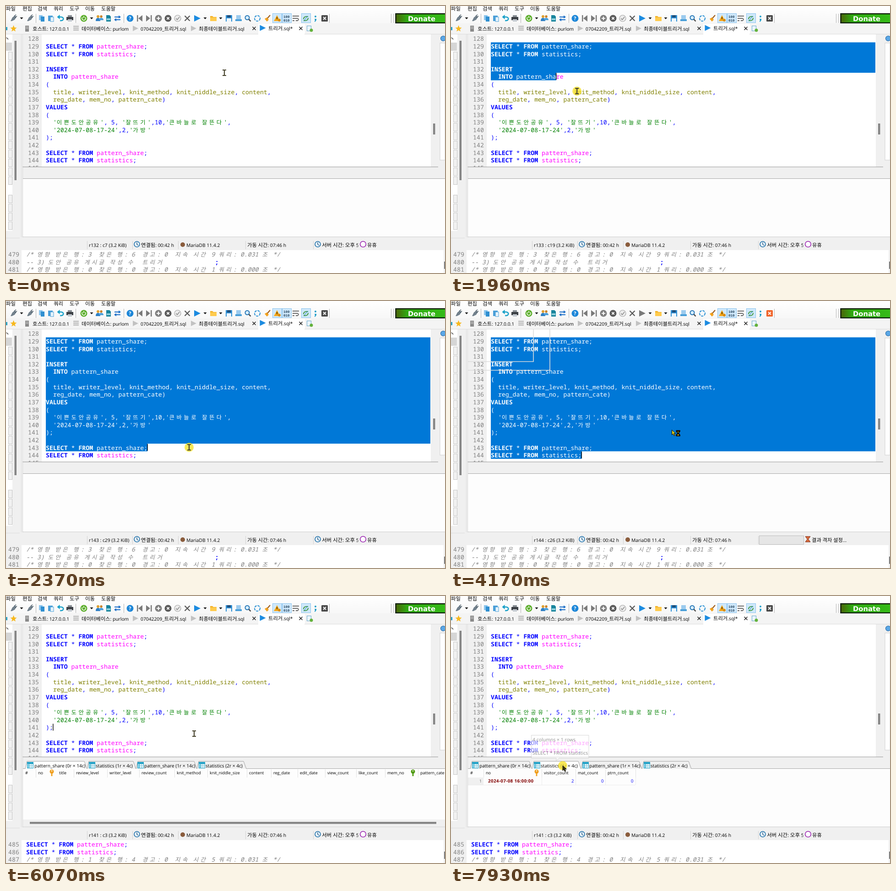
These frames come from a looping animation (959x584 px, 8 s). An HTML page:

```html
<!DOCTYPE html>
<html lang="ko">
<head>
<meta charset="utf-8">
<title>SQL editor</title>
<style>
html, body { margin: 0; width: 100%; height: 100%; overflow: hidden; background: #fff; }
svg { display: block; width: 959px; height: 584px; }
text { white-space: pre; text-rendering: geometricPrecision; }
.ui { font-family: "Open Sans", "Noto Sans CJK KR", sans-serif; }
.ko { font-family: "Noto Sans CJK KR", sans-serif; }
.ui .ko { font-size: 1.1em; }
.code { font-family: "Noto Sans Mono", "Noto Sans CJK KR", monospace; font-size: 13.2px; font-weight: 500; }
.code .ko { font-size: .94em; font-weight: 400; }
.code.bold { font-weight: 700; }
.code.slant { font-style: italic; font-weight: 400; }
.white text { fill: #fff; }
</style>
</head>
<body>
<svg id="stage" viewBox="0 0 959 584"></svg>
<script>
const stage = document.getElementById('stage');
const CELL = 7.93, ROW = 16.62, LEFT = 87, TOP = 79.4, FIRST = 129;
const BLUE = '#0000ff', SEL = '#0078d7', GREY = '#f0f0f0';

const code = [
  '', 'SELECT * FROM pattern_share;', 'SELECT * FROM statistics;', '', 'INSERT',
  '  INTO pattern_share', '(',
  '  title, writer_level, knit_method, knit_niddle_size, content,',
  '  reg_date, mem_no, pattern_cate)', 'VALUES', '(',
  "  '이쁜도안공유', 5, '잘뜨기',10,'큰바늘로 잘뜬다',",
  "  '2024-07-08-17-24',2,'가방'", ');', '',
  'SELECT * FROM pattern_share;', 'SELECT * FROM statistics;'
];

// drawing helpers
const cells = s => [...s].reduce((n, c) => n + (c >= '가' ? 2 : 1), 0);
const hangul = s => s.replace(/[가-힣]+/g, m => `<tspan class="ko">${m}</tspan>`);
const rect = (x, y, w, h, fill, more = '') =>
  `<rect x="${x}" y="${y}" width="${w}" height="${h}" fill="${fill}" ${more}/>`;
const path = (d, fill, stroke = 'none', w = 1) =>
  `<path d="${d}" fill="${fill}" stroke="${stroke}" stroke-width="${w}"/>`;
const line = (d, stroke, w = 1) => path(d, 'none', stroke, w);
const disc = (x, y, r, fill, stroke = 'none', w = 1) =>
  `<circle cx="${x}" cy="${y}" r="${r}" fill="${fill}" stroke="${stroke}" stroke-width="${w}"/>`;
const group = (id, body, more = '') => `<g id="${id}" ${more}>${body}</g>`;
const ui = (x, y, s, size = 10.3, fill = '#000', more = '') =>
  `<text class="ui" x="${x}" y="${y}" font-size="${size}" fill="${fill}" ${more}>${hangul(s)}</text>`;

function mono(x, y, s, fill, style = '') {
  const xs = [];
  for (const c of s) { xs.push(x.toFixed(1)); x += CELL * cells(c); }
  return `<text class="code ${style}" x="${xs.join(' ')}" y="${y}" fill="${fill}">${hangul(s)}</text>`;
}
function sql(x, y, s) {
  let out = '';
  for (const tok of s.match(/'[^']*'|[a-zA-Z_]+|[^'a-zA-Z_]+/g) || []) {
    const fill = tok[0] === "'" ? '#008000' : /pattern_share|statistics/.test(tok) ? '#ff00ff'
      : /^[a-z]/.test(tok) ? '#808000' : BLUE;
    out += mono(x, y, tok, fill, /^[A-Z]+$/.test(tok) ? 'bold' : '');
    x += CELL * cells(tok);
  }
  return out;
}
const note = (y, s) => mono(44, y, s, '#808080', 'slant');
const affected = (y, a, b, n, time) =>
  note(y, `/* 영향 받은 행: ${a}  찾은 행: ${b}  경고: 0  지속 시간 ${n} 쿼리: ${time} 조 */`);
const play = (x, y, fill, r = 7, id = '') =>
  `<path ${id && `id="${id}"`} d="M${x - r} ${y - r}l${2 * r} ${r}-${2 * r} ${r}z" fill="${fill}"/>`;
const drop = x => path(`M${x - 3.5} 25h7l-3.5 4z`, '#111');
const cross = (x, y, r, c, w = 1.5) =>
  line(`M${x - r} ${y - r}l${2 * r} ${2 * r}m0-${2 * r}l-${2 * r} ${2 * r}`, c, w);
const clock = x => disc(x, 521, 6, '#e8f4fc', '#1e6fa8', 1.6) + line(`M${x} 517v4.5l3 2`, '#1e4f78', 1.3);
const key = (x, y, c) => disc(x, y - 3, 4.5, c) + disc(x, y - 4.5, 1.2, '#fff') + rect(x - 1.4, y, 2.8, 7, c);
const sheet = (x, y) => rect(x, y, 14, 14, '#1f9fc4') + rect(x + 1, y + 4, 3, 9, '#8fd6ea') +
  rect(x + 5, y + 4.5, 8, 8.5, '#e9f7fb') + line(`M${x + 9} ${y + 4}v9M${x + 5} ${y + 8.5}h8`, '#7fc4d8');

function toolbar() {
  const plug = x => path(`M${x - 6} 33l4-8 5-4 4 3-4 6-6 3z`, '#71808c') + line(`M${x + 2} 22l4-3m-2 6l4-3`, '#3b4c58', 1.5);
  let s = rect(0, 0, 959, 38, 'url(#bar)');
  '파일 편집 검색 쿼리 도구 이동 도움말'.split(' ').forEach((m, i) =>
    s += ui([0, 36, 69, 104, 139, 173, 208][i], 10, m));
  s += plug(16) + drop(34) + plug(52);
  for (const x of [65, 152, 257, 706, 841, 846]) s += line(`M${x}.5 17v20`, '#b4b4b4');
  s += rect(72, 20, 8, 11, '#8cc6ee') + rect(76, 23, 8, 11, '#2f8fd0');
  s += rect(92, 21, 10, 12, '#4a9fd8') + rect(97, 24, 7, 10, '#e6f3fb', 'stroke="#4a9fd8"');
  s += line('M116 24h4c7 0 7 8 0 8h-2', '#18a0c8', 2.6) + path('M111.500 24l6-5v10z', '#18a0c8');
  s += rect(132, 24, 15, 7, '#3d4146') + rect(135, 20, 9, 4, '#8a9096') + rect(135, 29, 9, 5, '#c3c9cf');
  s += disc(170, 27, 7.5, '#5cae2c') + line('M167 24.500a4 4 0 1 0 6 0M170 22v4', '#fff', 1.6) + drop(187);
  s += disc(201, 23, 3, '#e0a030') + path('M196 33q0-7 5-7t5 7z', '#2f7fc4') +
    disc(208, 23, 2.7, '#c98228') + path('M203 31q0-5 5-5t5 5z', '#4da0dc');
  s += path('M219 20h7l3 3v11h-10z', '#18849c') + rect(220, 27, 8, 4, '#8fd0dc');
  s += line('M237 24h10M240 30h10', '#1d6fc8', 2) + path('M246 20.500l5 3.500-5 3.500zM241 26.500l-5 3.500 5 3.500z', '#1d6fc8');
  s += disc(271, 27, 7.5, '#1c86d8') + ui(268.300, 31, '?', 11, '#fff', 'font-weight="700"');
  s += rect(286, 20, 2.5, 14, '#7a7a7a') + path('M298 20v14l-9-7z', '#7a7a7a');
  s += rect(316, 20, 2.5, 14, '#7a7a7a') + path('M306 20v14l9-7z', '#7a7a7a');
  s += disc(333, 27, 7.5, '#808080') + line('M329 27h8m-4-4v8', '#fff', 2);
  s += disc(354, 27, 7.5, '#5a5a5a') + cross(354, 27, 2.6, '#fff', 2);
  s += disc(375, 27, 7, '#ececec', '#a6a6a6', 1.2) + line('M371.500 27l2.500 3 5-6', '#8c8c8c', 1.6);
  s += cross(396, 27, 5.5, '#5a5a5a', 2.4) + play(418, 27, '#1c8be0', 7, 'run') + drop(435);
  s += path('M446 22h5l2 2h7v9h-14z', '#f3b32a') + rect(446, 25, 14, 8, '#ffcb4d') + drop(469);
  s += rect(480, 20, 14, 14, '#2f8fd4') + rect(483, 20, 8, 5, '#1d4f7c') + rect(482, 27, 10, 7, '#eef6fc');
  s += rect(503, 20, 10, 9, '#9ccbee') + rect(501, 29, 14, 4, '#4a9fd8');
  s += disc(527, 25.500, 4.5, '#d8eefb', '#2878b8', 2) + line('M530.500 29l4 4.500', '#444', 2.5);
  s += `<circle cx="549" cy="27" r="6" fill="none" stroke="#2a90d4" stroke-width="2" stroke-dasharray="5 2"/>`;
  s += path('M565 28l5-3 4 5-4 4z', '#f2a11c') + line('M571 27l6-7', '#a36424', 2.5);
  for (const x of [582, 603, 645]) s += rect(x + .5, 16.500, 20, 20, '#cfe8fb', 'stroke="#8cc4ee"');
  s += path('M592 20l7 13h-14z', '#f5a71a') + rect(591.200, 24, 1.6, 5, '#4a3000') + disc(597, 31, 3, '#d98c10');
  s += ['100', '010'].map((d, i) => `<text x="606" y="${26 + i * 8}" font-size="7.500" font-weight="700" fill="#24435c" font-family="Liberation Mono,monospace">${d}</text>`).join('');
  s += line('M626 22h14M626 27h11q4 2 0 5h-4M626 32h4', '#6a6a6a', 1.8);
  s += line('M650 29q0-6 7-6h3M660 26q0 6-7 6h-3', '#4a9c4a', 2) + line('M651 32l8-10', '#2f8cc0', 1.2);
  s += disc(676, 23, 2, '#1c9cc8') + path('M674 28h4v3l-3 4-1-1 1-3z', '#1c9cc8');
  s += `<rect id="stop" x="689" y="20" width="14" height="14" rx="1.500"/>` + cross(696, 27, 3, '#fff', 1.8);
  s += rect(851.500, 17, 112, 20, 'url(#green)', 'stroke="#0a1a04" stroke-width="2.400"') +
    '<text x="878" y="33" font-size="14.800" font-weight="700" fill="#fff" font-family="DejaVu Sans,sans-serif">Donate</text>';
  return s;
}

function tabs() {
  let s = rect(0, 38, 959, 24, '#f4f4f4') + rect(551, 39, 102, 23, '#fff') + line('M0 61.500H551M652 61.500H959', '#dcdcdc');
  s += rect(0, 46, 3, 7, '#2ea3c4') +
    path('M16.500 42l2 5 5 .4-4 3.300 1.300 5-4.300-2.800-4.300 2.800 1.300-5-4-3.300 5-.4z', '#f7b81e');
  s += rect(42, 43, 8, 13, '#8a8a8a') + line('M43 46h6M43 49h6', '#ddd');
  s += [43, 47, 51].map(y => rect(147, y, 12, 3, '#c4c4c4')).join('');
  s += play(283, 49, '#c2c2c2', 6) + play(410, 49, '#c2c2c2', 6) + play(561, 48, '#1c8be0', 6.5);
  s += ui(58, 54, '호스트: 127.0.0.1') + ui(165, 54, '데이터베이스: purlom') + ui(294, 54, '07042209_트리거.sql') +
    ui(421, 54, '최종테이블트리거.sql') + ui(573, 53, '트리거.sql*');
  s += cross(542, 49, 3.5, '#222') + cross(644, 49, 3.5, '#222');
  s += rect(657.500, 43.500, 9, 11, '#eaf4fb', 'stroke="#6aa8cc"') + disc(667, 53, 3.5, '#62b13a');
  return s;
}

function sidePanels() {
  let s = rect(0, 62, 36, 446, GREY) + rect(0, 62, 14, 430, '#fff') + rect(0, 80, 13, 18, '#d6d6d6') + line('M1 69l4 4', '#333', 1.2);
  const box = y => rect(5.500, y + .5, 8, 17, '#f1f1f1', 'stroke="#c6c6c6"');
  for (let i = 0; i < 15; i++) s += box(100 + i * 19.500);
  for (let i = 0; i < 4; i++) s += box(413 + i * 19.500);
  s += rect(18.500, 76, 4.5, 305, '#868686') + line('M33.500 62V506M0 507.500H30', '#dcdcdc');
  s += rect(944, 62, 15, 291, GREY) + rect(948, 81, 11, 256, '#fff', 'stroke="#d0d0d0"') +
    disc(955, 71, 5.5, '#5aa7e6', '#2f6fa8', 1.2);
  return s;
}

const baseline = n => (76.300 + (n - 128) * ROW).toFixed(1);

function editor() {
  let s = rect(36, 62, 892, 290, '#fff') + rect(37, 62, 41, 290, GREY);
  for (let n = 128; n < 146; n++) s += mono(48, baseline(n), '' + n, '#808080');
  const lines = code.map((c, i) => sql(LEFT, baseline(128 + i), c)).join('');
  s += lines + group('picked', rect(80, 62, 850, 290, SEL) + lines, 'class="white" clip-path="url(#sel)"');
  s += `<rect id="caret" width="1.400" height="15" fill="#000"/>`;
  s += group('frames', line('M37 132.500H180V62M37 151.500H216V62', '#dcdcdc', 1.6));
  return `<g clip-path="url(#pane)">${s}</g>` +
    rect(928, 62, 16, 290, GREY) + rect(933, 257, 4.5, 24, '#858585') +
    line('M36.500 62V352', '#dedede') + line('M36 352H944', '#8c8c8c');
}

const head = (list, seps) => list.map(([x, s]) => ui(x, 390, s, 9)).join('') +
  seps.map(x => line(`M${x}.5 379V397`, '#e2e2e2')).join('');
const heel = [42, 177, 284, 417, 525];
const tab = (i, on) => path(`M${heel[i]} 378l4-16.500H${heel[i + 1] - 6}l6 16.500`, on ? '#fff' : GREY, '#a4a4a4');

function results() {
  const names = ['pattern_share (0r × 14c)', 'statistics (1r × 4c)', 'pattern_share (1r × 14c)', 'statistics (2r × 4c)'];
  const strip = on => heel.slice(0, 4).map((_, i) => tab(i, i === on)).join('') +
    names.map((n, i) => sheet([46, 181, 287, 421][i], 363) + ui([62, 196, 302, 436][i], 374.500, n, 10.1)).join('');
  const cols = 'title review_level writer_level review_count knit_method knit_niddle_size content reg_date edit_date view_count like_count mem_no'.split(' ');
  const at = [116, 153, 226, 296, 373, 445, 531, 584, 642, 702, 770, 833];
  const wide = strip(0) + head([[42, '#'], [70, 'no'], [905, 'pattern_cate'], ...cols.map((c, i) => [at[i], c])],
    [65, ...at.slice(1).map(x => x - 5), 900]) + key(100, 387, '#f0a020') + key(889, 387, '#4f9a10') +
    rect(37, 489, 922, 15, GREY) + rect(52, 494, 888, 4.5, '#858585');
  const small = strip(1) + head([[42, '#'], [76, 'no'], [203, 'visitor_count'], [277, 'mat_count'], [342, 'ptrn_count']],
    [71, 198, 272, 337, 403]) + key(187, 387, '#f0a020') + rect(37, 397, 34, 16, GREY) +
    ui(62, 408, '1', 9, '#666') +
    ui(81, 408, '2024-07-08 16:00:00', 9.8, '#800000', 'font-weight="700" letter-spacing=".35"') +
    [['2', 263], ['0', 328], ['0', 393]].map(([v, x]) => ui(x, 408, v, 9.5, BLUE)).join('') +
    line('M37 413.500H403M198.500 397V413M272.500 397V413M337.500 397V413M403.500 397V413', '#ececec');
  return rect(34, 353, 925, 25, GREY) + rect(36, 378, 923, 128, '#fdfdfd') + line('M36 377.500H959', '#a8a8a8') +
    group('wide', wide) + group('small', small) +
    line('M36.500 353V506', '#d8d8d8') + line('M36 505H959', '#c4c4c4') + rect(36, 506, 923, 7, GREY);
}

function status() {
  let s = rect(0, 508, 959, 26, GREY);
  for (const x of [177, 276, 376, 523, 671]) s += line(`M${x}.5 514V532`, '#d2d2d2');
  s += '<text id="pos" class="ui" x="181" y="527" font-size="10.300"></text>';
  s += clock(286) + ui(295, 527, '연결됨: 00:42 h') + disc(386, 522, 5, '#8a5c3c') + ui(394, 527, 'MariaDB 11.4.2') + ui(527, 527, '가동 시간: 07:46 h');
  s += group('idle', clock(681) + `<g clip-path="url(#cut)">${ui(690, 527, '서버 시간: 오후 5', 10.5)}</g>` +
    disc(780, 521, 6.300, '#fff', '#9a22b0', 1.6) + ui(789, 527, '유휴'));
  s += group('working', rect(673.500, 513.500, 97, 19, '#e6e6e6', 'stroke="#bdbdbd"') +
    path('M774 515h11l-4.500 6 4.500 6h-11l4.500-6z', '#d96a3a', '#7a2c18') + ui(788, 527, '결과 격자 설정...'));
  return s;
}

function log() {
  const y = [548, 564.600, 581.200];
  const nums = n => y.map((v, i) => mono(5, v, '' + (n + i), '#808080')).join('');
  return rect(0, 534, 959, 50, '#fff') + rect(0, 534, 34, 50, GREY) + rect(956, 534, 3, 50, GREY) + rect(957, 559, 2, 16, '#777') +
    group('before', nums(479) + affected(y[0], 3, 6, 9, '0.031') + note(y[1], '-- 3) 도안 공유 게시글 작성 수  트리거') +
      mono(44 + 52 * CELL, y[1], ';', BLUE, 'bold') + affected(y[2], 0, 0, 1, '0.000')) +
    group('after', nums(485) + sql(44, y[0], code[1]) + sql(44, y[1], code[2]) + affected(y[2], 1, 4, 5, '0.031'));
}

const tip = group('tip', path('M175.500 304.500h125.500v50h-65l-6 6v-6h-54.500z', '#fff', '#c4c4c4') +
  ui(178, 318, '4 columns × 1 rows', 10.5, '#555') + ui(178, 347, 'SELECT * FROM statistics', 10.5, '#555'));

const beam = 'M-4-6h3q1 0 1 1q0-1 1-1h3M0-5V5M-4 6h3q1 0 1-1q0 1 1 1h3';
const arrow = 'M0 0v11l2.700-2.500 2 4.500 2-1-2-4.300h3.700z';
const mouse = group('mouse', group('halo', disc(0, 0, 10, '#f5e020'), 'opacity=".75"') +
  group('beam', line(beam, '#46422c', 2.2)) +
  group('lit', line(beam, '#101010', 3.2) + line(beam, '#e8d820', 1.1)) +
  group('arrow', path(arrow, '#3a3408', '#111')) +
  group('wait', path(arrow, '#d8c818', '#111') +
    path('M9.500 1h8.500v2.500l-3 3.500 3 3.500v3H9.500v-3l3-3.500-3-3.500z', '#111', '#111') +
    path('M12 4h3.500l-1.700 2zM11.500 12l2.300-3 2.300 3z', '#d8c818')));

stage.innerHTML = `<defs>
  <linearGradient id="bar" x2="0" y2="1"><stop stop-color="#fff"/><stop offset="1" stop-color="#f7f7f7"/></linearGradient>
  <linearGradient id="green"><stop stop-color="#4c6408"/><stop offset=".22" stop-color="#2fa812"/><stop offset="1" stop-color="#36bc18"/></linearGradient>
  <clipPath id="sel"><path id="selPath"/></clipPath>
  <clipPath id="pane"><rect x="36" y="62" width="892" height="290"/></clipPath>
  <clipPath id="cut"><rect x="673" y="510" width="96.500" height="24"/></clipPath></defs>` +
  toolbar() + tabs() + sidePanels() + results() + editor() + status() + log() + tip + mouse;

// timing: the screen refreshes in short bursts [start, end, steps]
const bursts = [[120, 920, 12], [990, 1410, 7], [1610, 2370, 12], [2440, 2580, 3], [2840, 3120, 5],
  [4170, 4510, 6], [5720, 6070, 6], [6690, 7440, 12], [7510, 7930, 7]];
const track = [[50, 477, 146], [300, 390, 160], [920, 150, 104], [1410, 88, 88], [1610, 88, 88], [1885, 231, 154],
  [1955, 275, 186], [2240, 395, 317], [2370, 400, 320], [2510, 425, 338], [2770, 425, 338], [3120, 482, 282],
  [5650, 483, 282], [5790, 470, 289], [6070, 411, 301], [6620, 411, 301], [7000, 385, 314], [7440, 290, 344], [7720, 244, 371]];
const blinkOff = [[0, 340], [870, 1400], [3640, 4170], [4970, 5520], [6290, 6820], [7350, 8000]];

function snap(t) {
  let out = 0;
  for (const [a, b, n] of bursts) if (t >= a) {
    const d = (b - a) / (n - 1);
    out = Math.min(b, a + Math.floor((t - a) / d + 1e-6) * d);
  }
  return out;
}
function mouseAt(t) {
  const i = track.findIndex(k => k[0] > t);
  if (i === 0) return track[0].slice(1);
  if (i < 0) return track[track.length - 1].slice(1);
  const a = track[i - 1], b = track[i], p = (t - a[0]) / (b[0] - a[0]);
  return [a[1] + (b[1] - a[1]) * p, a[2] + (b[2] - a[2]) * p];
}
const clamp = (v, a, b) => Math.max(a, Math.min(b, v));
const rowTop = r => TOP + (r - FIRST) * ROW;
const within = (t, a, b) => t >= a && t < b;

function caretAt(t) {
  if (t < 1610) return [132, 6];
  if (t >= 5780) return [141, 2];
  if (t >= 2570) return [144, 25];
  const [x, y] = mouseAt(Math.max(1610, t - 70));
  const r = clamp(FIRST + Math.floor((y - TOP) / ROW), FIRST, 144);
  return [r, clamp(Math.round((x - LEFT) / CELL), 0, cells(code[r - 128]))];
}

const el = id => document.getElementById(id);
const show = (id, on) => el(id).style.display = on ? '' : 'none';

function draw(now) {
  const t = now % 8000, s = snap(t);
  const [x, y] = mouseAt(s), [row, col] = caretAt(s);
  const cx = LEFT + col * CELL, top = rowTop(row);
  const picked = within(s, 1610, 5780), busy = within(s, 4170, 4440);
  const press = within(t, 1610, 2840) || within(t, 5720, 5850) || t >= 7720;

  show('picked', picked);
  el('selPath').setAttribute('d', `M${LEFT} ${TOP}H927V${top}H${cx}V${top + ROW}H${LEFT}Z`);
  el('caret').setAttribute('x', cx - .7);
  el('caret').setAttribute('y', top + .6);
  show('caret', !blinkOff.some(([a, b]) => within(t, a, b)));
  el('pos').textContent = `r${row} : c${col + 1} (3.2 KiB)`;

  show('frames', within(s, 4170, 4230));
  show('working', busy);
  show('idle', !busy);
  el('run').setAttribute('fill', busy ? '#7a7a7a' : '#1c8be0');
  el('stop').setAttribute('fill', busy ? '#f0642a' : '#4a4a4a');
  show('before', s < 4230);
  show('after', s >= 4230);
  show('wide', within(s, 4300, 7780));
  show('small', s >= 7780);
  el('tip').style.opacity = s >= 7925 ? .66 : s >= 7855 ? .33 : 0;

  const pointer = y > 352, lit = picked && !press && y > TOP && y < top;
  el('mouse').setAttribute('transform', `translate(${x.toFixed(1)} ${y.toFixed(1)})`);
  show('halo', press);
  show('wait', busy);
  show('arrow', pointer && !busy);
  show('lit', lit && !busy);
  show('beam', !lit && !busy && !pointer);
  requestAnimationFrame(() => draw(performance.now() - start));
}
const start = performance.now();
draw(0);
</script>
</body>
</html>
```
